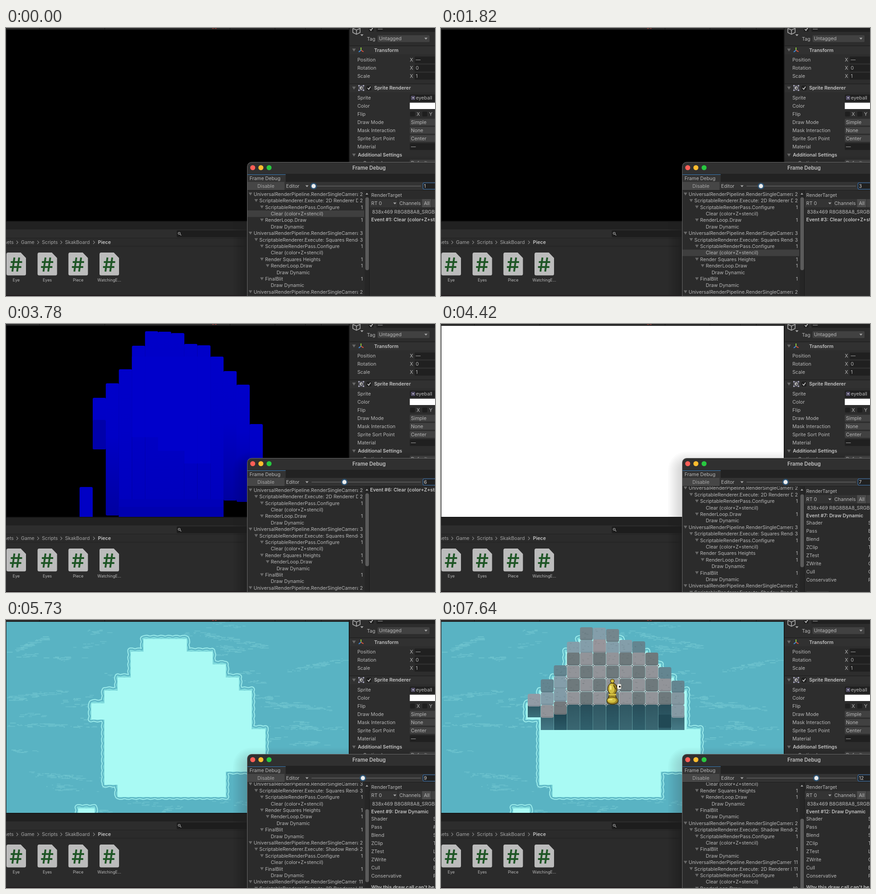
These frames come from a looping animation (945x592 px, 8 s). An HTML page with a canvas:

```html
<!DOCTYPE html>
<html lang="en">
<head>
<meta charset="utf-8">
<title>Frame debugger walkthrough</title>
<style>
html, body { margin: 0; width: 100%; height: 100%; overflow: hidden; background: #2b2b2b; }
canvas { display: block; width: 100vw; height: 100vh; }
</style>
</head>
<body>
<canvas id="stage" width="945" height="592"></canvas>
<script>
const ctx = document.getElementById('stage').getContext('2d');
const LOOP = 8000;
// start time, draw event, true while the new event is still loading
const STEPS = [
  [0, 1], [930, 2, true], [990, 2], [1820, 3], [2470, 4], [3120, 5], [3780, 6, true],
  [3830, 6], [4420, 7], [5070, 8], [5730, 9], [6330, 10], [6980, 11], [7640, 12]
];

// ---- helpers ----
function rect(x, y, w, h, color, r = 0) {
  ctx.fillStyle = color;
  ctx.beginPath();
  ctx.roundRect(x, y, w, h, r);
  ctx.fill();
}
function text(s, x, y, { size = 10.7, weight = 400, color = '#b8b8b8', align = 'left' } = {}) {
  ctx.font = `${weight} ${size}px Inter, sans-serif`;
  ctx.textAlign = align;
  ctx.fillStyle = color;
  ctx.fillText(s, x, y + size * 0.36);
}
const bold = (s, x, y, size = 10.7) => text(s, x, y, { size, weight: 600, color: '#c4c4c4' });
function poly(points, color) {
  ctx.fillStyle = color;
  ctx.beginPath();
  points.forEach(([x, y]) => ctx.lineTo(x, y));
  ctx.fill();
}
function line(points, color, width = 1) {
  ctx.strokeStyle = color;
  ctx.lineWidth = width;
  ctx.beginPath();
  points.forEach(([x, y], i) => i ? ctx.lineTo(x, y) : ctx.moveTo(x, y));
  ctx.stroke();
}
function ellipse(x, y, rx, ry, color) {
  ctx.fillStyle = color;
  ctx.beginPath();
  ctx.ellipse(x, y, rx, ry, 0, 0, Math.PI * 2);
  ctx.fill();
}
const circle = (x, y, r, color) => ellipse(x, y, r, r, color);
const fold = (x, y, color = '#686868') => poly([[x - 4, y - 3], [x + 4, y - 3], [x, y + 3.5]], color);
const arrow = (x, y) => poly([[x - 3.5, y - 2], [x + 3.5, y - 2], [x, y + 2]], '#a8a8a8');
function checkbox(x, y, checked) {
  rect(x, y, 11, 11, '#1f1f1f', 2);
  if (checked) line([[x + 2.5, y + 5.5], [x + 5, y + 8.5], [x + 9, y + 2.5]], '#d0d0d0', 1.6);
}
function clipped(x, y, w, h, draw) {
  ctx.save();
  ctx.beginPath();
  ctx.rect(x, y, w, h);
  ctx.clip();
  draw();
  ctx.restore();
}
function randomizer(seed) {
  return () => (seed = (seed * 16807) % 2147483647) / 2147483647;
}

// ---- game view ----
const CELL = 28.8;
const colX = i => 191 + CELL * i;
const COLUMN_TOPS = [163, 131, 100, 48, 16, 17, 20, 44, 47, 72, 104, 134, 221];
const ISLAND = [
  [303, 42], [398, 42], [398, 70], [455, 70], [455, 98], [484, 98], [484, 127], [513, 127],
  [513, 156], [541, 156], [541, 241], [571, 241], [571, 335], [484, 335], [484, 391],
  [246, 391], [246, 364], [217, 364], [217, 220], [188, 220], [188, 184], [217, 184],
  [217, 156], [246, 156], [246, 127], [275, 127], [275, 70], [303, 70]
];
const ISLET = [[159, 416], [195, 416], [195, 450], [159, 450]];

// Outline of both islands, optionally rippled.
function coast(ripple = 0) {
  const path = new Path2D();
  for (const shape of [ISLAND, ISLET]) {
    shape.forEach(([x, y], i) => {
      const [nx, ny] = shape[(i + 1) % shape.length];
      const n = Math.ceil(Math.hypot(nx - x, ny - y) / 4);
      for (let k = 0; k < n; k++) {
        const px = x + (nx - x) * k / n, py = y + (ny - y) * k / n;
        const X = px + ripple * Math.sin(py * 0.42), Y = py + ripple * Math.sin(px * 0.38);
        i + k ? path.lineTo(X, Y) : path.moveTo(X, Y);
      }
    });
    path.closePath();
  }
  return path;
}
function layeredCoast(layers, fill, ripple) {
  ctx.save();
  ctx.translate(0, -1.5);
  ctx.lineJoin = 'round';
  for (const [width, color] of layers) {
    ctx.strokeStyle = color;
    ctx.lineWidth = width;
    ctx.stroke(coast(ripple));
  }
  ctx.restore();
  ctx.fillStyle = fill;
  ctx.fill(coast());
}
function drawMask() {
  layeredCoast([[19, '#1c1c1c'], [16, '#484848'], [12, '#686868'], [8, '#8e8e8e'], [4, '#c8c8c8']], '#fff', 0.6);
}

function drawHeights() {
  const bottoms = { 0: 277, 1: 423, 10: 390, 11: 393, 12: 390 };
  COLUMN_TOPS.forEach((top, i) => {
    const bottom = bottoms[i] || 432;
    const shade = ctx.createLinearGradient(0, top, 0, bottom);
    const edge = i < 2 || i > 9;
    shade.addColorStop(0, '#0000c9');
    shade.addColorStop(0.4, '#0000c6');
    shade.addColorStop(1, edge ? '#0000a0' : '#0000bc');
    rect(colX(i), top, CELL + 0.3, bottom - top, shade, 3);
  });
  [250, 250, 280, 280, 308, 308].forEach((y, k) => rect(colX(3 + k), 72, CELL + 0.3, y - 72, '#0000cb'));
  rect(colX(2), 387, CELL * 8, 40, '#0000b8');
  rect(colX(2), 404, CELL * 8, 23, '#0000b0');
  rect(colX(0), 212, CELL, 65, '#0000aa', 3);
  rect(162, 360, 29, 80, '#0000c4', 3);
}

function drawWater() {
  rect(1, 4, 755, 423, '#59b3c3');
  const rnd = randomizer(4711);
  const streak = (cx, cy, spread, slope, n) => {
    for (let i = 0; i < n; i++) {
      const dx = (rnd() + rnd() - 1) * spread;
      const y = cy + dx * slope + (rnd() - 0.5) * 9;
      rect(Math.round(cx + dx), Math.round(y / 1.8) * 1.8, 2 + rnd() * 13, 1.8, rnd() < 0.7 ? '#67becb' : '#6dc3ce');
    }
  };
  for (let i = 0; i < 62; i++) streak(rnd() * 755, 8 + rnd() * 415, 20 + rnd() * 38, (rnd() - 0.65) * 0.4, 14);
  const patches = [[60, 165, 80, -0.12], [90, 232, 110, 0.02], [660, 238, 100, 0.02], [500, 45, 90, 0.2],
    [45, 55, 50, -0.4], [680, 100, 70, -0.2], [120, 345, 90, 0.08], [650, 190, 80, 0.1]];
  for (const [x, y, spread, slope] of patches) streak(x, y, spread, slope, 55);
  layeredCoast([[14.5, '#7bd0d8'], [13, '#9deeec'], [9.5, '#58b0c1'], [6.5, '#63bfca'], [3.5, '#82dcde']], '#a9faf4', 1);
}

function tile(x, y, h, color) {
  rect(x, y, CELL - 0.4, h, color, 4);
  rect(x + 2, y + h - 3, CELL - 4, 2, 'rgba(30,50,58,.14)', 1);
  const rnd = randomizer(Math.round(x * 31 + y * 17));
  for (let i = 0; i < 5; i++) {
    rect(x + 3 + rnd() * 20, y + 3 + rnd() * (h - 8), 1.8 + rnd() * 3, 1.8, 'rgba(40,60,66,.1)');
  }
}
function front(i, top, from, to, bottom = 243) {
  const shade = ctx.createLinearGradient(0, top, 0, bottom);
  shade.addColorStop(0, from);
  shade.addColorStop(1, to);
  rect(colX(i), top, CELL - 0.3, bottom - top, shade);
}
function drawTiles() {
  const light = '#929499', dark = '#6e797c', blue = '#849eaa', deep = '#648590';
  front(0, 185, '#2b5560', '#3b6f7b', 215);
  tile(colX(0), 163, 28, '#929ba5');
  front(1, 210, '#35616d', '#447986');
  tile(colX(1), 131, 29, deep);
  tile(colX(1), 160, 28, blue);
  tile(colX(1), 188, 28, light);
  front(2, 204, '#1d434f', '#2c5b68');
  tile(colX(2), 100, 24, deep);
  tile(colX(2), 124, 28, blue);
  tile(colX(2), 152, 28, '#829ba7');
  tile(colX(2), 180, 29, '#74797d');
  for (let i = 3; i < 11; i++) {
    front(i, 184, i % 2 ? '#2f5661' : '#274c58', i % 2 ? '#3a6772' : '#30606c');
    const top = COLUMN_TOPS[i];
    const boardTop = i === 10 ? 130 : 72;
    for (let y = top, k = 0; y < boardTop; y += CELL, k++) {
      tile(colX(i), y, Math.min(CELL, boardTop - y + 3), (i + k) % 2 ? blue : i < 7 ? '#74868d' : deep);
    }
    for (let r = i === 10 ? 2 : 0; r < 4; r++) {
      tile(colX(i), 72 + r * CELL, CELL - 0.3, (i + r) % 2 ? dark : light);
    }
  }
  tile(colX(5), 43, 28.5, '#98959b');
  rect(colX(10), 209, CELL - 0.5, 29, '#214955', 2);
  front(11, 211, '#37646f', '#477b87');
  tile(colX(11), 134, 27, deep);
  tile(colX(11), 160, 28, '#8497a0');
  tile(colX(11), 188, 28, '#869aa4');
  for (let i = 3; i < 11; i++) {
    for (let r = 1; r < 5; r++) {
      const x = colX(i), y = 72 + r * CELL;
      rect(x - 3.5, y - 1, 7, 1.8, 'rgba(205,214,216,.75)');
      rect(x - 1, y - 3.5, 1.8, 7, 'rgba(205,214,216,.75)');
      rect(x - 1, y - 1, 2, 2, '#35474c');
    }
  }
}

function drawEye() {
  rect(386.5, 143, 11, 8.5, '#26241e', 2);
  rect(388, 141.5, 9, 11, '#f3f0e6', 3);
  rect(392, 145.5, 3.6, 3.6, '#111');
}
function drawBishop() {
  const outline = '#4b3d12', shade = '#a08a26', gold = '#d3c041', shine = '#f5ea80';
  circle(377.5, 135, 4.8, outline);
  circle(377.5, 135, 3.4, gold);
  ellipse(377.5, 152, 10.8, 13.5, outline);
  ellipse(377.5, 152, 9.2, 12, shade);
  ellipse(375.5, 151.5, 7, 11, gold);
  rect(372, 145, 3.6, 9, shine, 1);
  line([[380, 144], [385, 153]], outline, 1.8);
  poly([[371, 162], [384, 162], [388, 174], [367, 174]], outline);
  poly([[373, 162], [382, 162], [386, 174], [369, 174]], shade);
  rect(369, 163, 17, 3.6, gold, 1);
  ellipse(377.7, 178.5, 13.2, 8.7, outline);
  ellipse(377.7, 178, 11.7, 7.3, shade);
  ellipse(376, 177, 9.5, 5.6, gold);
  rect(369.5, 175, 8, 2, shine);
}

function drawScene(event) {
  clipped(1, 4, 755, 422.3, () => {
    rect(1, 4, 755, 423, event === 6 || event === 7 ? '#fff' : event === 8 ? '#314d79' : '#000');
    if (event === 2) drawMask();
    if (event === 4 || event === 5) drawHeights();
    if (event >= 9) drawWater();
    if (event >= 10) drawTiles();
    if (event >= 11) drawEye();
    if (event >= 12) drawBishop();
  });
}

// ---- editor panels ----
function drawProject() {
  rect(0, 426.3, 757, 166, '#2b2b2b');
  rect(0, 426.3, 757, 19, '#212121');
  rect(0, 426.3, 757, 1.5, '#131313');
  rect(0, 445, 757, 19, '#2d2d2d');
  rect(376, 447, 200, 15, '#1d1d1d', 3);
  ctx.strokeStyle = '#aaa';
  ctx.lineWidth = 1.1;
  ctx.beginPath();
  ctx.arc(381.5, 453.5, 2.2, 0, 7);
  ctx.stroke();
  line([[383.3, 455.3], [386, 458]], '#aaa', 1.2);
  rect(0, 463.5, 757, 1, '#202020');
  rect(0, 481.5, 757, 1, '#232323');
  text('Assets', -17, 473.5, { color: '#a4a4a4' });
  [['Game', 33], ['Scripts', 79], ['SkakBoard', 130]].forEach(([s, x]) => text(s, x, 473.5, { color: '#a4a4a4' }));
  bold('Piece', 202.5, 473.5);
  for (const x of [25, 71, 122, 194]) line([[x - 2, 470], [x + 1.5, 473.5], [x - 2, 477]], '#8c8c8c', 1.1);
  [['Eye', 22.5], ['Eyes', 91], ['Piece', 159], ['WatchingE...', 227.5]].forEach(([label, cx]) => {
    ctx.save();
    ctx.translate(cx - 22, 496);
    ctx.fillStyle = '#bcbcbc';
    ctx.beginPath();
    ctx.moveTo(4, 0); ctx.lineTo(32, 0); ctx.lineTo(43.5, 12); ctx.lineTo(43.5, 47);
    ctx.quadraticCurveTo(43.5, 50.5, 40, 50.5); ctx.lineTo(4, 50.5);
    ctx.quadraticCurveTo(0.5, 50.5, 0.5, 47); ctx.lineTo(0.5, 4);
    ctx.quadraticCurveTo(0.5, 0, 4, 0);
    ctx.fill();
    for (const x of [0, 10.5]) line([[18 + x, 11], [13.5 + x, 42]], '#1f5626', 4);
    for (const y of [0, 11]) line([[10 - y / 6, 21 + y], [35 - y / 6, 21 + y]], '#1f5626', 4);
    ctx.restore();
    text(label, cx, 557, { size: 8.9, align: 'center' });
  });
  rect(0, 590.5, 757, 2, '#1b1316');
}

function field(y, value, dropdown) {
  rect(889.5, y - 7.5, 60, 15, dropdown ? '#414141' : '#202020', 2);
  text(value, 892, y);
}
function drawInspector() {
  rect(755, 0, 2, 445, '#191919');
  rect(757, 0, 188, 300, '#2d2d2d');
  const cube = '#b0b0b0';
  line([[764, 1], [772, 4.5], [780, 1], [780, 10], [772, 14], [764, 10], [764, 1]], cube, 1.5);
  line([[772, 4.5], [772, 14]], cube, 1.5);
  arrow(784, 16);
  checkbox(799, -3, true);
  rect(816, -5, 130, 13.5, '#202020', 2);
  text('—', 819, 2.5);
  text('Tag', 795, 24);
  rect(818.5, 16, 114.5, 15, '#414141', 2);
  text('Untagged', 821.5, 23.5);
  arrow(925, 23.5);
  for (const y of [39, 123]) {
    rect(757, y, 188, 1, '#1a1a1a');
    rect(757, y + 1, 188, 18, '#313131');
  }
  fold(766.5, 48.5);
  line([[782, 49], [782, 43]], '#8ecb3c', 2);
  line([[782, 49], [777, 53]], '#3d8fe0', 2);
  line([[782, 49], [787.5, 52.5]], '#e2553d', 2);
  bold('Transform', 811, 49);
  [['Position', '—'], ['Rotation', '0'], ['Scale', '1']].forEach(([label, value], i) => {
    const y = 70.5 + i * 18;
    text(label, 774, y);
    text('X', 889.5, y);
    rect(900, y - 7.5, 50, 15, '#202020', 2);
    text(value, 902.5, y);
  });
  fold(766.5, 132.5);
  for (const x of [777, 787]) for (const y of [127, 137]) rect(x - 1, y - 1, 3, 3, '#b9b9c9');
  line([[777.5, 127.5], [787.5, 127.5], [787.5, 137.5], [777.5, 137.5], [777.5, 127.5]], '#77748e');
  circle(782.5, 132.5, 3.4, '#c4c4c4');
  circle(783.2, 132.8, 1.6, '#333');
  checkbox(794, 127, true);
  bold('Sprite Renderer', 811, 132.5);
  ['Sprite', 'Color', 'Flip', 'Draw Mode', 'Mask Interaction', 'Sprite Sort Point', 'Material']
    .forEach((label, i) => text(label, 774, 154.5 + i * 18));
  rect(889.5, 147, 60, 15, '#202020', 2);
  rect(892.5, 150, 8.5, 8.5, '#6f6889', 1);
  rect(894, 151.5, 5.5, 5.5, '#242230');
  circle(896.8, 154.3, 1.8, '#d8d4e8');
  text('eyeball', 903, 154.5);
  rect(889.5, 165, 60, 14, '#fff');
  checkbox(890, 184.5);
  text('X', 904.5, 190.5);
  checkbox(917, 184.5);
  text('Y', 932, 190.5);
  field(208, 'Simple', true);
  field(226, 'None', true);
  field(244, 'Center', true);
  field(262, '—');
  fold(766.5, 280.5);
  bold('Additional Settings', 775, 280.5);
  text('Sorting Layer', 787, 298.5);
  field(298.5, 'Default', true);
}

function drawTopStrip() {
  rect(0, 0, 757, 4, '#2a2a2a');
  rect(0, 3, 757, 1.5, '#171717');
  for (const x of [73, 217, 493, 592, 659, 694]) rect(x, 0, 1, 4, '#151515');
  rect(454, 0, 4, 1.5, '#8e3a36');
  rect(460, 0, 4, 1.5, '#8e3a36');
  rect(0, 0, 1, 445, '#202020');
}

// ---- frame debugger window ----
const CAMERA = 'UniversalRenderPipeline.RenderSingleCamera';
const EXECUTE = 'ScriptableRenderer.Execute: ';
const CLEAR_PASS = [[2, 'ScriptableRenderPass.Configure', 1], [3, 'Clear (color+Z+stencil)']];
const BLIT = [[2, 'FinalBlit', 1], [3, 'Draw Dynamic']];
const camera = (name, count) => [[0, CAMERA, count], [1, EXECUTE + name, count], ...CLEAR_PASS];
const ROWS = [
  ...camera('2D Renderer Data', 2), [2, 'RenderLoop.Draw', 1], [3, 'Draw Dynamic'],
  ...camera('Squares Renderer', 3), [2, 'Render Squares Heights', 1], [3, 'RenderLoop.Draw', 1], [4, 'Draw Dynamic'],
  ...BLIT,
  ...camera('Shadow Renderer', 2), ...BLIT,
  ...camera('2D Renderer Data', 11), [2, 'RenderLoop.Draw', 10],
  ...Array.from({ length: 10 }, () => [3, 'Draw Dynamic'])
];
const LEAVES = ROWS.map((row, i) => row[2] ? -1 : i).filter(i => i >= 0);
const ROW_H = 14.4;
const LAST_VISIBLE = 20;

function drawTree(event) {
  const selected = LEAVES[event - 1];
  const scroll = selected < LAST_VISIBLE ? 0 : 4.4 + (selected - LAST_VISIBLE) * ROW_H;
  clipped(532, 359, 258, 233, () => ROWS.forEach(([depth, label, count], i) => {
    const y = 367 + i * ROW_H - scroll, x = 545.5 + depth * 12.6;
    if (y < 345 || y > 605) return;
    if (i === selected) rect(532, y - 7.2, 257, ROW_H, '#3f3f3f');
    if (count) {
      fold(x - 7, y - 0.5);
      text(count, 786, y, { align: 'right' });
    }
    clipped(532, 359, count > 9 ? 240.5 : 243.5, 233, () => text(label, x, y));
  }));
  rect(790, 359, 10, 233, '#262626');
  poly([[792, 368], [798, 368], [795, 364]], '#a0a0a0');
  rect(791.5, 374 + scroll * 0.485, 8, 161, '#5b5b5b', 4);
  rect(800, 359, 1, 233, '#1a1a1a');
}

function drawDetails(event, loading) {
  const clear = [1, 3, 6, 8].includes(event);
  const title = `Event #${event}: ${clear ? 'Clear (color+Z+stencil)' : 'Draw Dynamic'}`;
  if (loading) return bold(title, 802, 366.5);
  text('RenderTarget', 804.5, 369.5);
  rect(801, 378, 144, 18, '#343434');
  rect(863, 378, 1, 18, '#222');
  text('RT 0', 804.5, 387.5);
  arrow(856.5, 387.5);
  text('Channels', 866.5, 387.5);
  rect(916.5, 378, 20, 18, '#4c4c4c');
  text('All', 920.5, 387.5);
  rect(938, 378, 7, 18, '#414141');
  text(`838x469 ${event < 8 ? 'R8G8B8A8' : 'B8G8R8A8'}_SRGB`, 806.5, 406.5);
  bold(title, 804.5, 423);
  if (clear) return;
  const initials = event === 7 ? 'SEOTAOOF' : event > 7 ? 'S#STLOEF' : 'S#OTLOOF';
  ['Shader', 'Pass', 'Blend', 'ZClip', 'ZTest', 'ZWrite', 'Cull', 'Conservative'].forEach((label, i) => {
    text(label, 804.5, 439.5 + i * 18);
    text(initials[i], 941, 439.5 + i * 18);
  });
  if (event !== 7) bold("Why this draw call can't be batched", 804.5, 590.5);
  else rect(805, 590, 49, 2, '#3a3a3a');
}

function drawShadow() {
  for (let spread = 31; spread > 0; spread -= 3) {
    rect(531 - spread, 313 - spread, 600, 500, 'rgba(0,0,0,.016)', 10 + spread);
  }
}

function drawDebugger(event, loading) {
  drawShadow();
  rect(531, 296, 600, 500, '#6a6a6a', 10);
  rect(532, 297, 600, 500, '#303030', 9);
  [['#ff5f57', 543.5], ['#febc2e', 561.5], ['#28c840', 579.5]].forEach(([c, x]) => circle(x, 308.5, 5.5, c));
  bold('Frame Debug', 763, 308.5, 11.4);
  rect(532, 322, 413, 18, '#222');
  rect(532, 323, 84, 18, '#333');
  rect(532, 323, 84, 1.2, '#3a72a5');
  text('Frame Debug', 536.5, 332.5);
  rect(532, 340, 413, 18, '#333');
  rect(532, 340, 81.5, 18, '#464646');
  rect(532, 358, 413, 1, '#1c1c1c');
  text('Disable', 572.5, 349.5, { align: 'center', color: '#a8a8a8' });
  text('Editor', 617, 349.5);
  arrow(663, 349.5);
  rect(673, 348.5, 241, 1.6, '#606060');
  const knob = 677.6 + (event - 1) * 13.57;
  circle(knob, 349.2, 7.2, '#2d5475');
  circle(knob, 349.2, 4.6, '#ececec');
  rect(918, 341.5, 40, 15, '#3a79bb', 3);
  rect(919, 342.5, 40, 13, '#202020', 2);
  text(event, 920.5, 349.3, { color: '#d2d2d2' });
  rect(532, 359, 413, 233, '#2b2b2b');
  drawTree(event);
  drawDetails(event, loading);
}

function draw([, event, loading]) {
  drawTopStrip();
  drawScene(loading ? event - 1 : event);
  drawProject();
  drawInspector();
  drawDebugger(event, loading);
}

const start = performance.now();
let current;
function tick() {
  const time = (performance.now() - start) % LOOP;
  const step = STEPS.findLast(([from]) => from <= time);
  if (step !== current) draw(current = step);
  requestAnimationFrame(tick);
}
tick();
</script>
</body>
</html>
```
